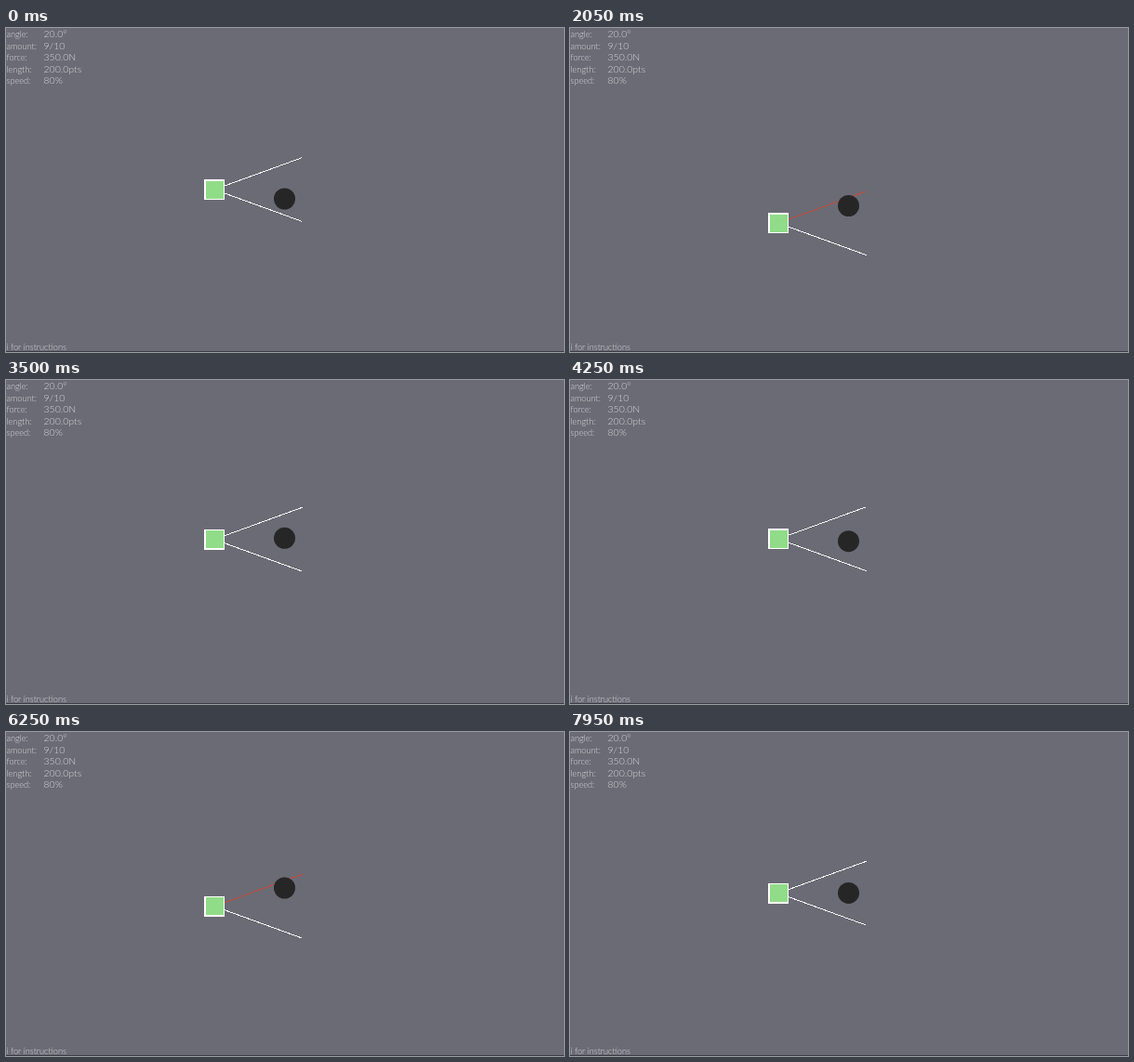
An HTML page that plays this animation: 600 px wide and 349 px high, repeating every 8 s.

```html
<!DOCTYPE html>
<html lang="en">
<head>
<meta charset="utf-8">
<style>
  html, body { margin: 0; width: 100%; height: 100%; overflow: hidden; background: #6b6b75; }
  svg { display: block; width: 600px; height: 349px; }
  text { font: 300 9.2px Lato, sans-serif; fill: #d6d6da; }
  .value { font-size: 10.5px; }
  #seeker { shape-rendering: crispEdges; }
  .feeler { stroke: #f4f4f4; stroke-width: 1; }
  .feeler.hit { stroke: #c64a35; }
</style>
</head>
<body>
<svg viewBox="0 0 600 349">
  <rect width="600" height="349" fill="#6b6b75"/>
  <rect y="348" width="600" height="1" fill="#3c3c42"/>
  <g id="stats"></g>
  <text x="0.5" y="347">i for instructions</text>
  <g id="seeker">
    <line id="upper" class="feeler" x1="224" y1="0" x2="318.5" y2="-34.4"/>
    <line id="lower" class="feeler" x1="224" y1="0" x2="318.5" y2="34.4"/>
    <rect x="213.75" y="-10.25" width="20.5" height="20.5" fill="#91dc88" stroke="#fff" stroke-width="1.5"/>
  </g>
  <circle id="ball" cx="299.5" r="11.5" fill="#262626"/>
</svg>
<script>
const LOOP = 8000, STEP = 50;
const REACH = 10; // how far the ball may stray before a feeler touches it
const $ = id => document.getElementById(id);

// Turning points as [time, y]; the motion eases from one to the next.
const seekerTurns = [[0, 174], [550, 173], [1230, 160.5], [2310, 218], [3210, 166.5],
  [3860, 179], [4925, 152.5], [6050, 193], [6920, 150.5], [7690, 176], [LOOP, 173.5]];
const ballTurns = [[0, 184], [900, 170], [2050, 191.5], [3620, 170],
  [5150, 180], [6250, 168], [LOOP, 173.5]];

const stats = { angle: "20.0°", amount: "9/10", force: "350.0N", length: "200.0pts", speed: "80%" };
$("stats").innerHTML = Object.entries(stats).map(([label, value], i) => {
  const y = 10 + i * 12.6;
  return `<text x="0.5" y="${y}">${label}:</text><text class="value" x="40.5" y="${y}">${value}</text>`;
}).join("");

function swing(turns, t) {
  const next = turns.findIndex(([time]) => time > t);
  const [t0, y0] = turns[next - 1], [t1, y1] = turns[next];
  const eased = (1 - Math.cos(Math.PI * (t - t0) / (t1 - t0))) / 2;
  return y0 + (y1 - y0) * eased;
}

function draw(elapsed) {
  const t = Math.floor(elapsed % LOOP / STEP) * STEP;
  const seekerY = swing(seekerTurns, t), ballY = swing(ballTurns, t);
  const offset = ballY - seekerY;
  $("seeker").setAttribute("transform", `translate(0 ${seekerY})`);
  $("ball").setAttribute("cy", ballY);
  $("upper").classList.toggle("hit", offset < -REACH);
  $("lower").classList.toggle("hit", offset > REACH);
}

let start;
function tick(now) {
  start ??= now;
  draw(now - start);
  requestAnimationFrame(tick);
}
draw(0);
requestAnimationFrame(tick);
</script>
</body>
</html>
```
